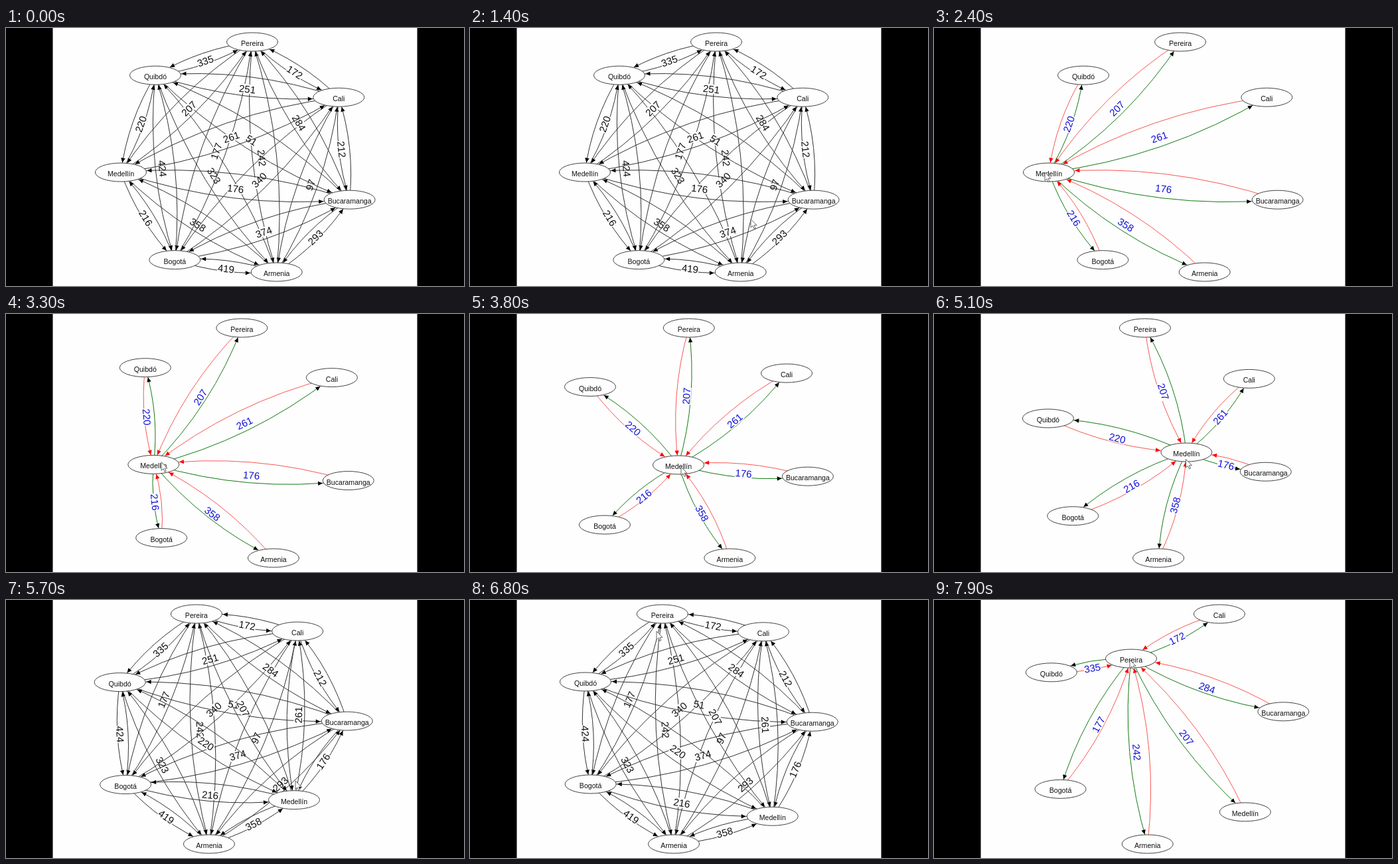
These frames come from a looping animation (690x388 px, 8 s). An HTML page:

```html
<!DOCTYPE html>
<html lang="es">
<head>
<meta charset="utf-8">
<title>Grafo de ciudades</title>
<style>
  html, body { margin: 0; width: 100%; height: 100%; overflow: hidden; background: #000; }
  svg { display: block; width: 100vw; height: 100vh; }
  text { font-family: "Liberation Sans", Arial, sans-serif; text-anchor: middle; }
  .city { font-size: 10.6px; fill: #111; }
  .dist { font-size: 15px; }
</style>
</head>
<body>
<svg id="stage" viewBox="0 0 690 388">
  <rect width="690" height="388" fill="#000"/>
  <rect x="70.5" width="549" height="388" fill="#fefefe"/>
</svg>
<script>
const LOOP = 8000, STEP = 100;
const RX = 38.5, RY = 14, TOP = 21, BOTTOM = 367, BEND = 0.105, GAP = 1.04;
const PAPER = '#fefefe';

const cities = {
  A: 'Armenia', G: 'Bogotá', B: 'Bucaramanga', C: 'Cali',
  M: 'Medellín', P: 'Pereira', Q: 'Quibdó'
};
const keys = Object.keys(cities);
// Upper triangle of the distance matrix, row by row.
const distances = [419, 293, 97, 358, 242, 323, 374, 340, 216, 177, 424,
                   212, 176, 284, 51, 261, 172, 251, 207, 220, 335];

// Cities spread on a circle, clockwise, at the given angles.
function circle(order, cx, cy, r, angles) {
  const pos = {};
  [...order].forEach((key, i) => {
    const a = angles[i] * Math.PI / 180;
    pos[key] = { x: cx + r * Math.cos(a), y: cy + r * Math.sin(a) };
  });
  return pos;
}
// At rest all seven form a regular heptagon.
const heptagon = (order, cx, cy, start) =>
  circle(order, cx, cy, 178, keys.map((_, i) => start + i * 360 / 7));

const idle = heptagon('PCBAGMQ', 350, 198, -83.2);
const settled = heptagon('PCBMAGQ', 338, 192, -105.7);
const layouts = [
  { t: 2900, still: true, pos: idle },
  { t: 3800, pos: { ...circle('PCBAGQ', 336, 197, 179, [-92, -38, 15, 72, 138, 210]), M: { x: 314, y: 226 } } },
  { t: 4500, pos: { ...circle('PCBAGQ', 344, 195, 171, [-89, -18, 32, 80, 130, 185]), M: { x: 327, y: 132 } } },
  { t: 5700, pos: { ...heptagon('PCBMAGQ', 336, 192, -106), M: { x: 434, y: 301 } } },
  { t: 6500, still: true, pos: settled },
  { t: 7300, still: true, pos: settled },
  { t: 7900, pos: { ...circle('CBMAGQ', 344, 185, 183, [-62, -5, 47, 97, 147, 204]), P: { x: 297, y: 90 } } }
];

// time, x, y
const pointer = [
  [1000, 496, 328], [1300, 496, 328], [1500, 350, 247], [1600, 350, 247],
  [2000, 167, 217], [2900, 167, 217], [3800, 318, 230], [4500, 323, 165],
  [5700, 436, 272], [6800, 281, 47], [7300, 288, 21], [7900, 295, 90]
];

const stage = document.getElementById('stage');
function add(parent, tag, attrs = {}) {
  const el = document.createElementNS('http://www.w3.org/2000/svg', tag);
  set(el, attrs);
  return parent.appendChild(el);
}
function set(el, attrs) {
  for (const k in attrs) el.setAttribute(k, attrs[k]);
}
const show = (el, on) => set(el, { visibility: on ? 'visible' : 'hidden' });

function makeArc(parent) {
  return {
    line: add(parent, 'path', { fill: 'none', 'stroke-width': 1 }),
    head: add(parent, 'path')
  };
}

// Each pair is painted whole, so later lines cross earlier labels.
const pairs = [];
keys.forEach((a, i) => {
  for (const b of keys.slice(i + 1)) {
    const group = add(stage, 'g');
    const go = makeArc(group), back = makeArc(group);
    const label = add(group, 'g');
    add(label, 'rect', { x: -13, y: -7, width: 26, height: 14, fill: PAPER });
    add(label, 'text', { class: 'dist', y: 5.4 }).textContent = distances[pairs.length];
    pairs.push({ a, b, group, go, back, label });
  }
});

const nodes = {};
for (const key of keys) {
  const g = nodes[key] = add(stage, 'g');
  add(g, 'ellipse', { rx: RX, ry: RY, fill: PAPER, stroke: '#444', 'stroke-width': 1 });
  add(g, 'text', { class: 'city', y: 6 }).textContent = cities[key];
}

const cursor = add(stage, 'path', {
  d: 'M0 0V12.5L2.9 9.9L5 14.5L7 13.6L5 9.2H9Z',
  fill: '#fff', stroke: '#555', 'stroke-width': 0.9, 'stroke-linejoin': 'round'
});

// Index of the segment that holds time t.
function segment(list, time, t) {
  let i = 0;
  while (i < list.length - 2 && t >= time(list[i + 1])) i++;
  return i;
}
const clamp = u => Math.max(0, Math.min(1, u));

function slope(i, key, axis) {
  if (layouts[i].still) return 0;
  const lo = layouts[i - 1], hi = layouts[Math.min(i + 1, layouts.length - 1)];
  return (hi.pos[key][axis] - lo.pos[key][axis]) / (hi.t - lo.t);
}

function spline(key, axis, t) {
  const i = segment(layouts, l => l.t, t), p = layouts[i], q = layouts[i + 1];
  const d = q.t - p.t, u = clamp((t - p.t) / d), w = 1 - u;
  return p.pos[key][axis] * (1 + 2 * u) * w * w + q.pos[key][axis] * u * u * (3 - 2 * u)
       + d * u * w * (slope(i, key, axis) * w - slope(i + 1, key, axis) * u);
}

// The layout always fills the full height of the panel.
function layoutAt(t) {
  const pts = {};
  for (const key of keys) pts[key] = { x: spline(key, 'x', t), y: spline(key, 'y', t) };
  const ys = keys.map(key => pts[key].y);
  const min = Math.min(...ys), scale = (BOTTOM - TOP) / (Math.max(...ys) - min);
  for (const key of keys) pts[key].y = TOP + (pts[key].y - min) * scale;
  return pts;
}

function pointerAt(t) {
  const i = segment(pointer, p => p[0], t);
  const [t0, x0, y0] = pointer[i], [t1, x1, y1] = pointer[i + 1];
  const u = clamp((t - t0) / (t1 - t0));
  return [x0 + (x1 - x0) * u, y0 + (y1 - y0) * u];
}

const degrees = (x, y) => Math.atan2(y, x) * 180 / Math.PI;

function drawArc(arc, p, q, [color, headColor]) {
  const cx = (p.x + q.x) / 2 - (q.y - p.y) * BEND;
  const cy = (p.y + q.y) / 2 + (q.x - p.x) * BEND;
  const at = u => {
    const w = 1 - u;
    return [w * w * p.x + 2 * u * w * cx + u * u * q.x,
            w * w * p.y + 2 * u * w * cy + u * u * q.y];
  };
  // Find where the curve meets the rim of the end node.
  let lo = 0.3, hi = 1;
  for (let i = 0; i < 16; i++) {
    const mid = (lo + hi) / 2, [x, y] = at(mid);
    if (Math.hypot((x - q.x) / RX, (y - q.y) / RY) > GAP) lo = mid; else hi = mid;
  }
  const [x, y] = at(lo);
  const angle = degrees((1 - lo) * (cx - p.x) + lo * (q.x - cx),
                        (1 - lo) * (cy - p.y) + lo * (q.y - cy));
  set(arc.line, { d: `M${p.x} ${p.y}Q${cx} ${cy} ${q.x} ${q.y}`, stroke: color });
  set(arc.head, {
    d: 'M0 0L-7 -3.2V3.2Z', fill: headColor,
    transform: `translate(${x} ${y}) rotate(${angle})`
  });
}

function placeLabel(el, p, q, fill) {
  const angle = degrees(q.x - p.x, q.y - p.y) + (q.x < p.x ? 180 : 0);
  set(el, {
    fill,
    transform: `translate(${(p.x + q.x) / 2} ${(p.y + q.y) / 2}) rotate(${angle}) translate(1 4)`
  });
}

function pickedAt(t) {
  if (t >= 2400 && t < 5600) return 'M';
  return t >= 7200 ? 'P' : '';
}

function render(t) {
  const pts = layoutAt(t), picked = pickedAt(t);
  const style = from => !picked ? ['#333', '#000']
    : from === picked ? ['#147a14', '#000'] : ['#fa5656', '#f00'];

  for (const { a, b, group, go, back, label } of pairs) {
    show(group, !picked || a === picked || b === picked);
    drawArc(go, pts[a], pts[b], style(a));
    drawArc(back, pts[b], pts[a], style(b));
    placeLabel(label, pts[a], pts[b], picked ? '#1212d8' : '#111');
  }
  for (const key of keys) {
    set(nodes[key], { transform: `translate(${pts[key].x} ${pts[key].y})` });
  }
  const [x, y] = pointerAt(t);
  show(cursor, t >= 1000);
  set(cursor, { transform: `translate(${x} ${y})` });
}

const start = performance.now();
function tick() {
  const t = (performance.now() - start) % LOOP;
  render(Math.floor(t / STEP) * STEP);
  requestAnimationFrame(tick);
}
tick();
</script>
</body>
</html>
```
